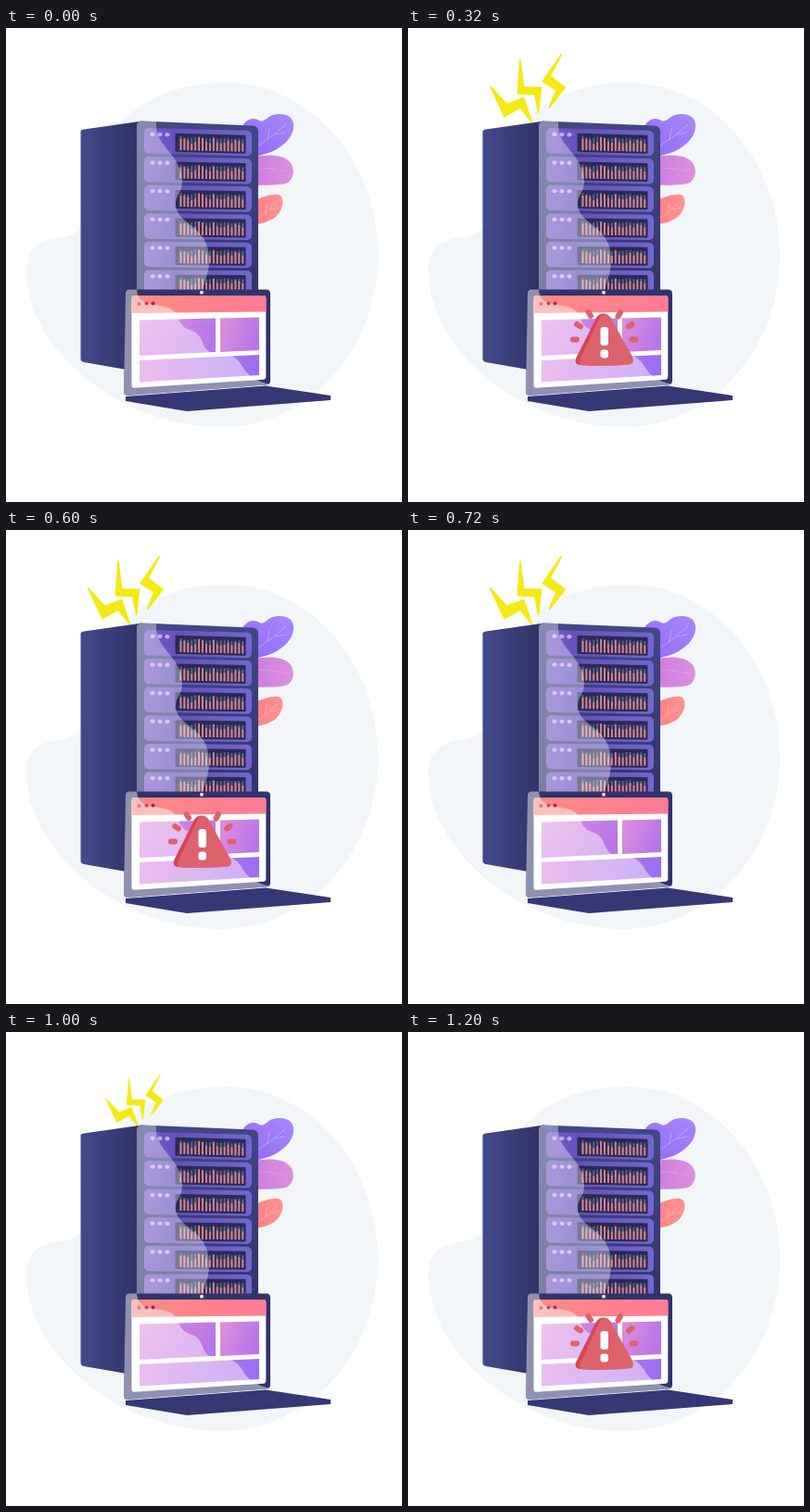
An HTML page that plays this animation: 427x512 px, repeating every 1.36 s.

```html
<!DOCTYPE html>
<html lang="en">
<head>
<meta charset="utf-8">
<title>Server alert</title>
<style>
html, body { margin: 0; width: 100%; height: 100%; overflow: hidden; background: #fff; }
svg { display: block; width: 100%; height: 100%; }

/* 34 ticks of 40 ms per loop */
.bolts {
  fill: #f5e914;
  stroke: #f5e914;
  stroke-width: 1.8;
  stroke-linejoin: round;
  transform-origin: 169px 102px;
  animation: zap 1360ms step-end infinite;
}
.alert { animation: blink 1360ms step-end infinite; }

@keyframes zap {
  0% { transform: scale(0); }
  2.941% { transform: scale(.58); }
  5.882% { transform: scale(1.14); }
  8.824% { transform: scale(1.27); }
  11.765% { transform: scale(1.155); }
  14.706% { transform: scale(1.06); }
  17.647% { transform: scale(1.01); }
  20.588% { transform: scale(1); }
  61.765% { transform: scale(.992); }
  64.706% { transform: scale(.974); }
  67.647% { transform: scale(.938); }
  70.588% { transform: scale(.87); }
  73.529% { transform: scale(.76); }
  76.471% { transform: scale(.59); }
  79.412% { transform: scale(.34); }
  82.353%, 100% { transform: scale(0); }
}
@keyframes blink {
  0% { opacity: 0; }
  2.941% { opacity: 1; }
  52.941% { opacity: 0; }
  88.235%, 100% { opacity: 1; }
}
</style>
</head>
<body>
<svg viewBox="0 0 427 512" preserveAspectRatio="none">
  <defs>
    <linearGradient id="side">
      <stop offset="0" stop-color="#434a8c"/>
      <stop offset=".3" stop-color="#3d437f"/>
      <stop offset="1" stop-color="#2f3065"/>
    </linearGradient>
    <linearGradient id="front" x2="0" y2="1">
      <stop offset="0" stop-color="#434886"/>
      <stop offset="1" stop-color="#32336d"/>
    </linearGradient>
    <linearGradient id="unit">
      <stop offset="0" stop-color="#7a5cc6"/>
      <stop offset=".3" stop-color="#6450bd"/>
      <stop offset="1" stop-color="#7067cf"/>
    </linearGradient>
    <linearGradient id="violet" x1="0" y1="1" x2="1" y2="0">
      <stop offset="0" stop-color="#9068f6"/>
      <stop offset="1" stop-color="#a988fb"/>
    </linearGradient>
    <linearGradient id="orchid">
      <stop offset="0" stop-color="#cc7cde"/>
      <stop offset="1" stop-color="#dc90e0"/>
    </linearGradient>
    <linearGradient id="coral">
      <stop offset="0" stop-color="#ff7f86"/>
      <stop offset="1" stop-color="#ff9390"/>
    </linearGradient>
    <linearGradient id="bar">
      <stop offset="0" stop-color="#ff8a80"/>
      <stop offset="1" stop-color="#ff7c98"/>
    </linearGradient>
    <linearGradient id="tile" x1="0" y1="0" x2="1" y2=".35">
      <stop offset="0" stop-color="#e08fdc"/>
      <stop offset="1" stop-color="#b877e8"/>
    </linearGradient>
    <linearGradient id="wide">
      <stop offset="0" stop-color="#d985de"/>
      <stop offset="1" stop-color="#9b6df2"/>
    </linearGradient>
    <clipPath id="face"><path d="M141 106Q141 100.500 147 100.500L266 105.500Q272 106 272 112V290H141Z"/></clipPath>
    <clipPath id="lid"><path id="lidPath" d="M129 287Q129 282.500 133 282.500L281 282.500Q285 282.500 285 287V381Q285 385 281 385.500L131 397Q127 397 127 393Z"/></clipPath>
  </defs>

  <path fill="#f2f6f9" d="M237 59C330 59 401 145 401 245C401 350 325 431 232 431C120 431 22 345 22 262C22 238 36 229 60 226C90 223 95 190 100 150C105 110 150 59 237 59Z"/>

  <g fill="none" stroke="#fff" stroke-opacity=".4" stroke-width=".7">
    <path stroke="none" fill="url(#violet)" d="M256 140V104C262 97 268 97 273 100C278 102 280 98 285 95C296 91 309 93 310 104C311 118 298 128 288 133C281 136 274 137 268 140Z"/>
    <path d="M272 127Q288 117 302 104M282 121L284 108M290 115L301 113"/>
    <path stroke="none" fill="url(#orchid)" d="M266 140C280 136 296 137 303 142C312 148 312 161 304 167C294 171 280 169 268 170Z"/>
    <path stroke-opacity=".2" d="M272 151Q288 151 303 155M285 152L292 145M287 152L295 161"/>
    <path stroke="none" fill="url(#coral)" d="M266 187C280 181 291 178 296 181C302 188 296 201 288 206C281 210 275 211 268 212Z"/>
    <path d="M272 205Q283 199 293 187M280 200L281 190M285 196L294 194"/>
  </g>

  <g class="bolts">
    <path d="M89 63L106.500 82.500L124.500 75.500L133.500 101.500L121 86L104 95.500Z"/>
    <path d="M121 34.500L124.500 64L143.500 64.500L140.500 91L137 71.500L118.500 70.500Z"/>
    <path d="M165 29L153 52L169 64.500L152.500 85.500L160 67L145.500 57.500Z"/>
  </g>

  <path fill="url(#side)" d="M80.500 112Q80.500 110 84 109.500L147 100.500V372L84 361Q80.500 360 80.500 357Z"/>

  <g clip-path="url(#face)">
    <path fill="url(#front)" d="M141 98H273V290H141Z"/>
    <g id="rack"></g>
    <path fill="#fff" opacity=".36" d="M141 98H162V106C162 128 190 138 190 166C190 178 183 180 183 190C183 213 219 212 219 250C219 269 212 276 211 290H141Z"/>
  </g>

  <path fill="#363875" d="M129 398L280 386.500L350 397V402L195 414L129 403Z"/>
  <use href="#lidPath" fill="#32336c"/>
  <g clip-path="url(#lid)">
    <g id="screen">
      <path fill="#fff" d="M135.500 292Q135.500 289 138 289H277.500Q280.300 289 280.300 292V376.500Q280.300 379.500 277.500 379.700L138 388.700Q135.500 388.700 135.500 386Z"/>
      <path fill="url(#bar)" d="M135.500 292Q135.500 289 138 289H277.500Q280.300 289 280.300 292V306.500L135.500 308Z"/>
      <path fill="url(#tile)" d="M144 315.500L226 313.500V350L144 354Z"/>
      <path fill="url(#tile)" d="M231 313.500L273 312.500V348L231 350Z"/>
      <path fill="url(#wide)" d="M144 359L273 353V375L144 382.500Z"/>
    </g>
    <path fill="#fff" opacity=".46" d="M126 282H141C142 304 168 296 179 304C189 311 184 321 198 326C213 331 210 341 217 348C224 355 241 350 249 358C258 366 256 378 285 385V400H126Z"/>
    <circle cx="143.500" cy="298" r="2" fill="#d07d97"/>
    <circle cx="151.500" cy="297.500" r="2" fill="#a94b78"/>
    <circle cx="158.500" cy="297.500" r="2" fill="#a32650"/>
  </g>
  <circle cx="211" cy="285.700" r="1.900" fill="#fff"/>

  <g class="alert">
    <path fill="#d94452" d="M203 313Q207 307 213 309L230 364H186Q179 364 181 357Z"/>
    <path fill="#dd626d" d="M207 312Q212 305 218 312L242 355Q245 362 239 363.500Q212 366 188 364.500Q184 363 186 357Z"/>
    <path fill="none" stroke="#dd626d" stroke-width="6" stroke-linecap="round" d="M178 336.500H182M182 320L186 322.500M194.500 307L197 311M229 307L226.500 311.500M241.500 320L238 322.500M241.500 336.500H245.500"/>
    <rect x="207.500" y="323" width="8.500" height="20" rx="3" fill="#fff"/>
    <rect x="207.500" y="347.500" width="8.500" height="9" rx="3" fill="#fff"/>
  </g>
</svg>
<script>
const rack = document.getElementById('rack');

function add(parent, tag, attrs) {
  const el = document.createElementNS('http://www.w3.org/2000/svg', tag);
  for (const key in attrs) el.setAttribute(key, attrs[key]);
  return parent.appendChild(el);
}

function rect(parent, x, y, width, height, fill, rx = 0) {
  add(parent, 'rect', { x, y, width, height, fill, rx });
}

let seed = 4711;
function random() {
  seed = (seed * 16807) % 2147483647;
  return seed / 2147483647;
}

// Every unit shows the same bar pattern.
const bars = Array.from({ length: 18 }, (_, i) => ({
  x: 38.5 + i * 3.93,
  top: 8 + random() * 2,
  fill: 6 + random() * 9
}));

for (let row = 0; row < 6; row++) {
  const tilt = 1.4 - row * 0.24;
  const unit = add(rack, 'g', {
    transform: `translate(149 ${108 + row * 30.7}) skewY(${tilt})`
  });
  rect(unit, 0, 0, 116, 27.5, 'url(#unit)', 5);
  for (let i = 0; i < 3; i++) {
    add(unit, 'ellipse', { cx: 9 + i * 8, cy: 6.6, rx: 2.6, ry: 2.2, fill: '#c4a9e8' });
  }
  rect(unit, 33.5, 5, 76, 20, '#2b2a54', 1);
  for (const { x, top, fill } of bars) {
    rect(unit, x, top, 1.9, 23 - top, '#56648a');
    rect(unit, x, 23 - fill, 1.9, fill, '#dd8089');
  }
}
</script>
</body>
</html>
```
